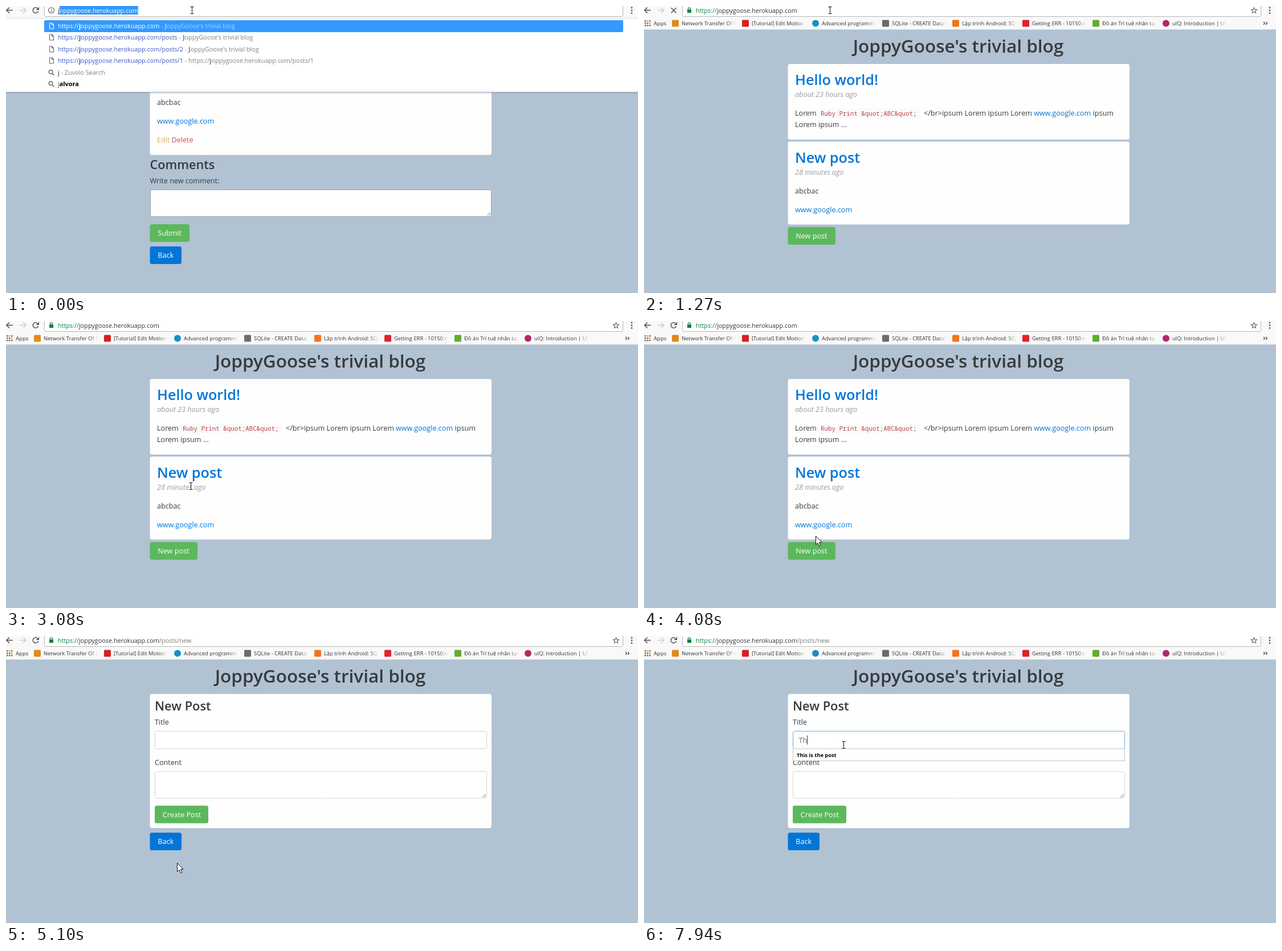
An HTML page with a canvas that plays this animation: 1109x505 px, repeating every 8000 ms.

```html
<!DOCTYPE html>
<html lang="en">
<head>
<meta charset="utf-8">
<title>Trivial blog</title>
<style>
html, body { margin: 0; width: 100%; height: 100%; overflow: hidden; background: #b1c2d3; }
canvas { display: block; }
</style>
</head>
<body>
<canvas id="stage" width="1109" height="505"></canvas>
<script>
const c = document.getElementById('stage').getContext('2d');
const LOOP = 8000;
const SANS = '"Open Sans", "Noto Sans", sans-serif';
const MONO = '"Noto Sans Mono", "DejaVu Sans Mono", monospace';
const BG = '#b1c2d3', BAR = '#f9f9f9', INK = '#373a3c', GRAY = '#808080';
const BLUE = '#0275d8', BLUE_DARK = '#014c8c', GREEN = '#5cb85c', GREEN_DARK = '#449d44';
const SELECT = '#3399ff', BODY = 12.6, URL_SIZE = 10.85;
const HOST = 'joppygoose.herokuapp.com';
const BLOG = "JoppyGoose's trivial blog";

// Pointer: start time, hot spot, shape. Each pose holds until the next.
const POINTER = [
  [0, 326, 7, 'beam'],
  [1800, 390, 66, 'beam'], [1950, 352, 95, 'arrow'], [2100, 331, 150, 'beam'],
  [2690, 338, 215, 'beam'], [2830, 342, 266, 'hand'], [2960, 340, 340, 'arrow'],
  [3080, 324, 290, 'beam'], [3240, 325, 151, 'beam'],
  [3540, 320, 147, 'beam'], [3680, 320, 190, 'beam'], [3820, 316, 266, 'hand'],
  [3950, 306, 330, 'arrow'], [4080, 301, 378, 'arrow'], [4240, 303, 392, 'hand'],
  [4390, 301, 398, 'hand'], [4540, 300, 399, 'hand'],
  [5100, 300, 399, 'arrow'],
  [5530, 311, 382, 'arrow'], [5670, 320, 335, 'arrow'], [5810, 331, 266, 'beam'],
  [5950, 344, 214, 'arrow'], [6090, 350, 191, 'beam']
];

const MARKS = [
  ['Network Transfer Of Files', '#e08a1e'],
  ['[Tutorial] Edit Motion Clips', '#d8201f'],
  ['Advanced programming', '#1c8fc0', true],
  ['SQLite - CREATE Database', '#6b6b6b'],
  ['Lập trình Android: SQLite', '#f4731c'],
  ['Getting ERR - 10150:new', '#e3202b'],
  ['Đồ án Trí tuệ nhân tạo', '#5fae2e'],
  ['ulQ: Introduction | UlQ', '#b5266b', true]
];

function text(s, x, y, size, color, style = '', family = SANS) {
  c.font = `${style} ${size}px ${family}`;
  c.fillStyle = color;
  c.fillText(s, x, y);
  return x + c.measureText(s).width;
}

// Runs of [string, colour, style] set one after another.
function flow(x, y, size, runs) {
  for (const [s, color, style] of runs) x = text(s, x, y, size, color, style);
  return x;
}

function rect(x, y, w, h, fill) {
  c.fillStyle = fill;
  c.fillRect(x, y, w, h);
}

function round(x, y, w, h, r, fill, stroke) {
  c.beginPath();
  c.roundRect(x, y, w, h, r);
  if (fill) { c.fillStyle = fill; c.fill(); }
  if (stroke) { c.strokeStyle = stroke; c.lineWidth = 1; c.stroke(); }
}

function line(points, color, width = 1) {
  c.beginPath();
  points.forEach(([x, y], i) => i ? c.lineTo(x, y) : c.moveTo(x, y));
  c.strokeStyle = color;
  c.lineWidth = width;
  c.stroke();
}

function ring(x, y, r, color, width, from = 0, to = 2 * Math.PI) {
  c.beginPath();
  c.arc(x, y, r, from, to);
  c.strokeStyle = color;
  c.lineWidth = width;
  c.stroke();
}

function disc(x, y, r, color) {
  c.beginPath();
  c.arc(x, y, r, 0, 2 * Math.PI);
  c.fillStyle = color;
  c.fill();
}

function shape(points, fill, stroke) {
  c.beginPath();
  points.forEach(([x, y], i) => i ? c.lineTo(x, y) : c.moveTo(x, y));
  c.closePath();
  c.fillStyle = fill;
  c.fill();
  c.strokeStyle = stroke;
  c.lineWidth = 1;
  c.stroke();
}

// Browser frame

function arrowIcon(x, dir, color) {
  line([[x - 6 * dir, 7.5], [x + 5 * dir, 7.5]], color, 1.6);
  line([[x, 2.5], [x + 5 * dir, 7.5], [x, 12.5]], color, 1.6);
}

function reloadIcon() {
  ring(52, 7.5, 4.7, '#555', 1.6, 0.3, 5.3);
  c.beginPath();
  c.moveTo(58, 1.5);
  c.lineTo(58, 7);
  c.lineTo(52.5, 7);
  c.fillStyle = '#555';
  c.fill();
}

function stopIcon() {
  line([[47.7, 3.2], [56.7, 12.2]], '#555', 1.6);
  line([[56.7, 3.2], [47.7, 12.2]], '#555', 1.6);
}

function infoIcon() {
  ring(79.5, 7.5, 5, '#666', 1.2);
  rect(79, 6.8, 1.3, 3.7, '#666');
  rect(79, 4.3, 1.3, 1.4, '#666');
}

function lockIcon() {
  ring(79.5, 5.5, 2.3, '#0b8043', 1.3, Math.PI, 0);
  rect(76, 6, 7, 6, '#0b8043');
}

function starIcon() {
  c.beginPath();
  for (let i = 0; i < 10; i++) {
    const a = -Math.PI / 2 + i * Math.PI / 5, r = i % 2 ? 2.3 : 5.3;
    c.lineTo(1070.5 + r * Math.cos(a), 8 + r * Math.sin(a));
  }
  c.closePath();
  c.strokeStyle = '#666';
  c.lineWidth = 1.1;
  c.stroke();
}

function toolbar(height, loading) {
  rect(0, 0, 1109, height, BAR);
  arrowIcon(6, -1, '#555');
  arrowIcon(30, 1, '#cfcfcf');
  loading ? stopIcon() : reloadIcon();
  round(67.5, -9.5, 1015, 28, 2, '#fff', '#b8b8b8');
  for (const y of [3, 7.7, 12.4]) disc(1098, y, 1.4, '#555');
}

function bookmarks() {
  const dots = ['#e04a3a', '#f0a020', '#3c9a50', '#4a80d8'];
  for (let i = 0; i < 9; i++)
    rect(1 + i % 3 * 4, 25 + Math.floor(i / 3) * 4, 2.6, 2.6, dots[i % 4]);
  text('Apps', 17, 34, 9.6, '#333');
  MARKS.forEach(([label, color, circle], i) => {
    const x = 66 + 123 * i;
    if (circle) disc(x - 11, 30.5, 6, color);
    else round(x - 17, 24.5, 12, 12, 1.5, color);
    c.save();
    c.beginPath();
    c.rect(x, 22, 95, 18);
    c.clip();
    text(label, x, 34, 9.4, '#333');
    const fade = c.createLinearGradient(x + 80, 0, x + 95, 0);
    fade.addColorStop(0, BAR + '00');
    fade.addColorStop(1, BAR);
    rect(x + 80, 22, 15, 18, fade);
    c.restore();
  });
  for (const x of [1087, 1091])
    line([[x, 28], [x + 2.5, 30.5], [x, 33]], '#444', 1.2);
}

function browser(loading, secure, path) {
  toolbar(42, loading);
  rect(0, 41, 1109, 1, '#d3d6d9');
  secure ? lockIcon() : infoIcon();
  flow(91, 12, URL_SIZE, [
    ['https://', secure ? '#0b8043' : '#777'], [HOST, '#333'], [path, '#777']
  ]);
  starIcon();
  bookmarks();
}

function fileIcon(y, color) {
  line([[80.5, y - 5], [76.5, y - 5], [76.5, y + 5], [83.5, y + 5], [83.5, y - 2],
    [80.5, y - 5], [80.5, y - 2], [83.5, y - 2]], color, 1.1);
}

function searchIcon(y) {
  ring(78.5, y - 1, 3.3, '#666', 1.4);
  line([[81, y + 1.5], [84.5, y + 5]], '#666', 1.6);
}

function suggestions() {
  toolbar(22, false);
  rect(0, 21, 1109, 1, '#dcdcdc');
  infoIcon();
  const end = text('j', 91, 12, URL_SIZE, '#333');
  c.font = `${URL_SIZE}px ${SANS}`;
  rect(end, 0, c.measureText(HOST.slice(1)).width, 15, SELECT);
  text(HOST.slice(1), end, 12, URL_SIZE, '#fff');

  rect(0, 22, 1109, 130, '#fff');
  rect(0, 151, 1109, 1, '#a7b1bb');
  rect(0, 152, 1109, 2, 'rgba(60,70,85,.14)');
  round(67, 25, 1016, 21, 2, SELECT);

  const address = (tail, color) => [
    ['https://', color], ['j', color, '700'], [HOST.slice(1) + tail, color]
  ];
  const title = color => [[' - ', color], ['J', color, '700'], [BLOG.slice(1), color]];
  const link = '#3a56c8';
  const rows = [
    [...address('', '#fff'), ...title('#a9d3ff')],
    [...address('/posts', link), ...title(GRAY)],
    [...address('/posts/2', link), ...title(GRAY)],
    [...address('/posts/1', link), [' - ', GRAY], ...address('/posts/1', GRAY)],
    [['j', '#222'], [' - Zuvolo Search', GRAY]],
    [['j', '#555'], ['alvora', '#000', '700']]
  ];
  rows.forEach((runs, i) => {
    const y = Math.floor(39 + 20.5 * i);
    if (i < 4) fileIcon(y - 4, i ? '#666' : '#fff');
    else searchIcon(y - 4);
    flow(91, y, URL_SIZE, runs);
  });
}

// Pages

function heading() {
  c.textAlign = 'center';
  text(BLOG, 551.5, 82, 31.5, INK, '600');
  c.textAlign = 'left';
}

const card = (y, h, fill = '#fefefe') => round(252.5, y, 599.5, h, 4, fill);

function button(label, x, y, w, fill) {
  round(x, y, w, 31, 3.5, fill);
  text(label, x + 13.8, y + 20, BODY, '#fff');
}

function area(x, y, w, h, border) {
  round(x + .5, y + .5, w - 1, h - 1, 3, '#fff', border);
  for (const d of [3, 6])
    line([[x + w - 2 - d, y + h - 2], [x + w - 2, y + h - 2 - d]], '#777', .9);
}

function postTitle(label, y, hover) {
  const end = text(label, 265, y, 25.2, hover ? BLUE_DARK : BLUE, '600');
  if (hover) rect(265, y + 3, end - 265, 2, BLUE_DARK);
}

function postPage() {
  heading();
  card(102, 160);
  round(252.5, 102, 599.5, 54, [4, 4, 0, 0], '#f9f9fa');
  postTitle('New post', 139, false);
  text('abcbac', 265, 174, BODY, INK);
  text('www.google.com', 265, 207, BODY, BLUE);
  flow(265, 240, BODY, [['Edit', '#f0ad4e'], [' ', INK], ['Delete', '#d34a4c']]);
  text('Comments', 252.5, 287, 21.7, INK, '600');
  text('Write new comment:', 252.5, 312, BODY, INK);
  area(253, 323, 599, 48, '#9fa5ab');
  button('Submit', 252.5, 384, 69.5, GREEN);
  button('Back', 252.5, 423, 55.5, BLUE);
}

function homePage(p) {
  const overPost = p.shape === 'hand' && p.y < 300;
  const overButton = p.shape === 'hand' && p.y > 388;
  heading();
  card(102, 133);
  postTitle('Hello world!', 139, false);
  text('about 23 hours ago', 265, 160, BODY, '#9b9b9b', 'italic');
  text('Lorem', 265, 193, BODY, INK);
  round(305, 180, 179, 17, 3, '#fafafb');
  text('Ruby Print &quot;ABC&quot;', 310, 193, 10.8, '#bd4147', '', MONO);
  text('</br>ipsum Lorem ipsum Lorem', 491, 193, BODY, INK);
  text('www.google.com', 684, 193, BODY, BLUE);
  text('ipsum', 787.5, 193, BODY, INK);
  text('Lorem ipsum ...', 265, 213, BODY, INK);
  card(238.5, 146);
  postTitle('New post', 276, overPost);
  text('28 minutes ago', 265, 297, BODY, '#9b9b9b', 'italic');
  text('abcbac', 265, 330, BODY, INK);
  text('www.google.com', 265, 363, BODY, BLUE);
  button('New post', 252.5, 389, 83.5, overButton ? GREEN_DARK : GREEN);
}

function formPage(t) {
  const focus = t >= 6360;
  const typed = t >= 7940 ? 'Th' : t >= 7790 ? 'T' : '';
  const caret = focus && !(t >= 6770 && t < 7330);
  heading();
  card(102, 236);
  text('New Post', 261, 131, 21.8, INK, '600');
  text('Title', 261, 156, BODY, INK);
  round(261.5, 167.5, 582, 31, 3, '#fff', focus ? '#66afe9' : '#d6d6d6');
  const end = text(typed, 271.5, 188, BODY, '#66696c');
  if (caret) rect(Math.round(end - .4), 175, 1, 16, '#333');
  text('Content', 261, 227, BODY, INK);
  area(261, 238, 583, 48, '#d6d6d6');
  button('Create Post', 261, 298.5, 94, GREEN);
  button('Back', 252.5, 346, 55.5, BLUE);
  if (typed) {
    round(261.5, 198.5, 582, 21, 0, '#fff', '#c6c6c6');
    text('This is the post', 268, 213, 9.3, '#000', '700');
  }
}

// Pointer shapes

const CURSORS = {
  beam(x, y) {
    const path = [[x, y - 6], [x, y + 6]];
    line(path, 'rgba(255,255,255,.6)', 2.5);
    line([[x + .5, y - 5.5], [x + .5, y + 5.5]], '#111');
    for (const d of [-6, 6])
      line([[x - 2.5, y + d + .5], [x + 3.5, y + d + .5]], '#111');
  },
  arrow(x, y) {
    const pts = [[0, 0], [0, 15], [3.5, 12], [6, 17.5], [8.5, 16.5], [6, 11], [10.5, 11]];
    shape(pts.map(([a, b]) => [x + a + .5, y + b + .5]), '#fff', '#111');
  },
  hand(x, y) {
    const pts = [[0, 0], [2, 0], [2.5, 6], [9, 7.5], [10, 9.5], [9, 14], [8, 18],
      [1, 18], [-4, 11.5], [-3.5, 10], [-.5, 12]];
    shape(pts.map(([a, b]) => [x + a, y + b + .5]), '#fff', '#111');
  }
};

function pointerAt(t) {
  const [, x, y, shape] = POINTER.findLast(p => p[0] <= t);
  return { x, y, shape };
}

function draw(t) {
  const p = pointerAt(t);
  rect(0, 0, 1109, 505, BG);
  if (t < 1270) postPage();
  else if (t < 5100) homePage(p);
  else formPage(t);
  if (t < 150) suggestions();
  else browser(t < 1420, t >= 1270, t >= 4840 ? '/posts/new' : '');
  CURSORS[p.shape](p.x, p.y);
}

const start = performance.now();
function tick() {
  draw((performance.now() - start) % LOOP);
  requestAnimationFrame(tick);
}
tick();
</script>
</body>
</html>
```
